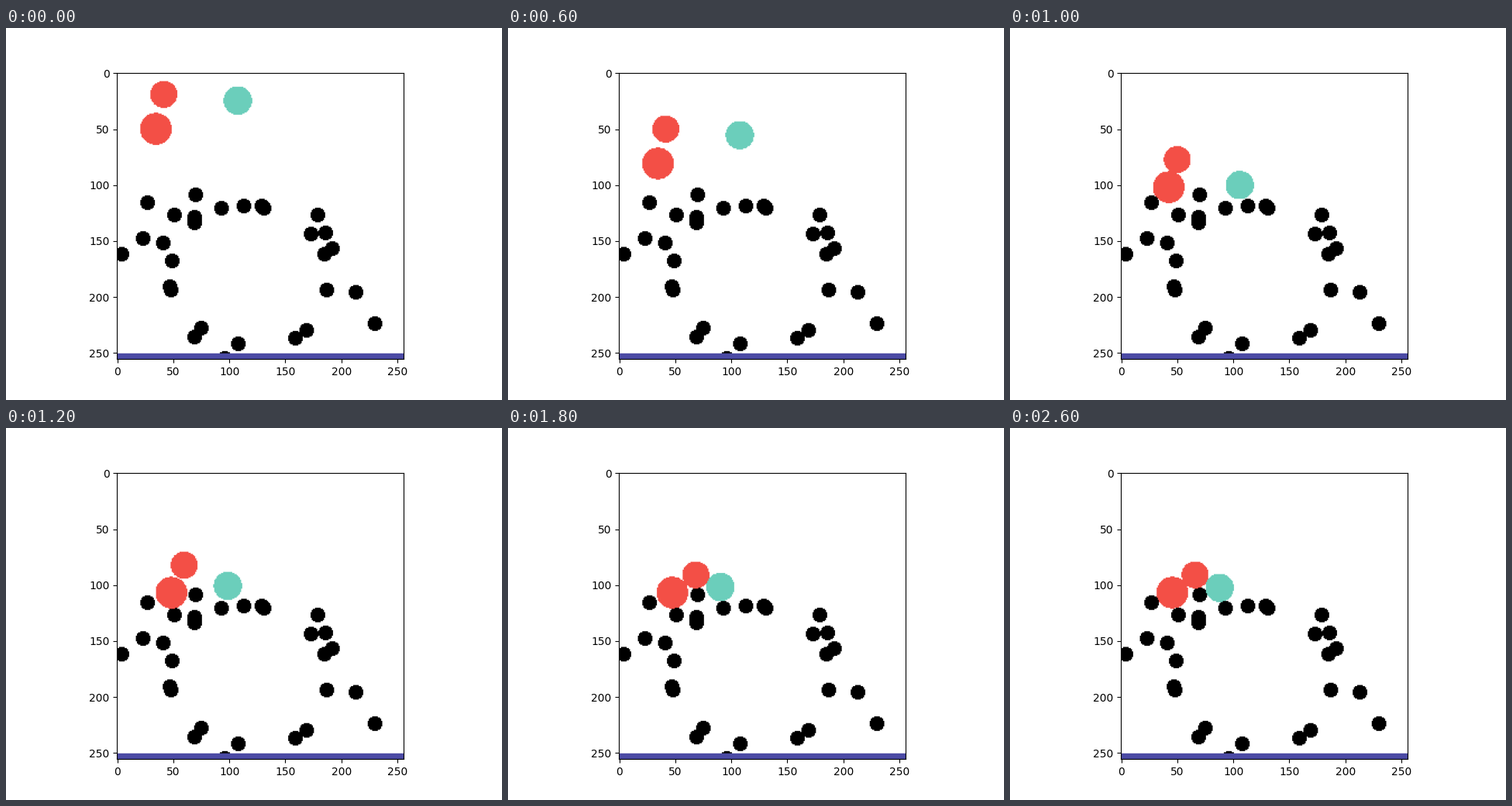
A matplotlib script that plays this animation: 640 px wide and 480 px high, repeating every 10000 ms.

```python
import matplotlib.pyplot as plt
import numpy as np
from matplotlib.animation import FuncAnimation

SIZE = 256
FRAMES, INTERVAL = 50, 200
RED = (243, 79, 70)
TEAL = (107, 206, 187)
PURPLE = (75, 74, 164)
BLACK = (0, 0, 0)
PEG_RADIUS = 6.5
FLOOR_ROW = 251

# Scattered pegs, grouped by the part of the loop they form
TOP = [(27, 116), (51, 127), (70, 109), (69, 129), (69, 134),
       (93, 121), (113, 119), (129, 119), (131, 121)]
RIGHT = [(179, 127), (173, 144), (186, 143), (192, 157), (185, 162),
         (187, 194), (213, 196), (230, 224)]
LEFT = [(4, 162), (23, 148), (41, 152), (49, 168), (47, 191), (48, 194)]
BOTTOM = [(75, 228), (69, 236), (96, 255), (108, 242), (159, 237), (169, 230)]

# colour, radius, drop point, then (step, x, y) where the motion turns
BALLS = [
    (RED, 12.1, (41.4, 19.3),
     [(4, 43.3, 72.3), (5, 49.9, 77.5), (7, 69.3, 87.5),
      (9, 68.3, 91.2), (13, 65.9, 91.1)]),
    (RED, 14.2, (34.4, 50.1),
     [(4, 36.4, 97.2), (6, 48.2, 107.1), (7, 49.2, 107.0), (11, 45.5, 107.0)]),
    (TEAL, 12.7, (107.5, 24.8),
     [(5, 105.7, 100.3), (7, 91.5, 101.7), (13, 87.7, 102.7)]),
]

rows, cols = np.mgrid[:SIZE, :SIZE]


def paint_disc(canvas, center, radius, color):
    x, y = center
    canvas[(cols - x) ** 2 + (rows - y) ** 2 <= radius ** 2] = color


def ball_position(drop, turns, step):
    """Free fall until the first turn, then roll from turn to turn."""
    times, xs, ys = zip(*turns)
    if step < times[0]:
        x, y = drop
        return x, y + 0.7 * step + 3.2 * step ** 2
    return np.interp(step, times, xs), np.interp(step, times, ys)


def make_backdrop():
    canvas = np.full((SIZE, SIZE, 3), 255, dtype=np.uint8)
    for peg in TOP + RIGHT + LEFT + BOTTOM:
        paint_disc(canvas, peg, PEG_RADIUS, BLACK)
    canvas[FLOOR_ROW:] = PURPLE
    return canvas


backdrop = make_backdrop()


def render(step):
    canvas = backdrop.copy()
    for color, radius, drop, turns in BALLS:
        paint_disc(canvas, ball_position(drop, turns, step), radius, color)
    return canvas


fig, ax = plt.subplots(figsize=(6.4, 4.8), dpi=100)
picture = ax.imshow(render(0))


def update(step):
    picture.set_data(render(step))
    return (picture,)


anim = FuncAnimation(fig, update, frames=FRAMES, interval=INTERVAL,
                     repeat=True, repeat_delay=0)
plt.show()
```
